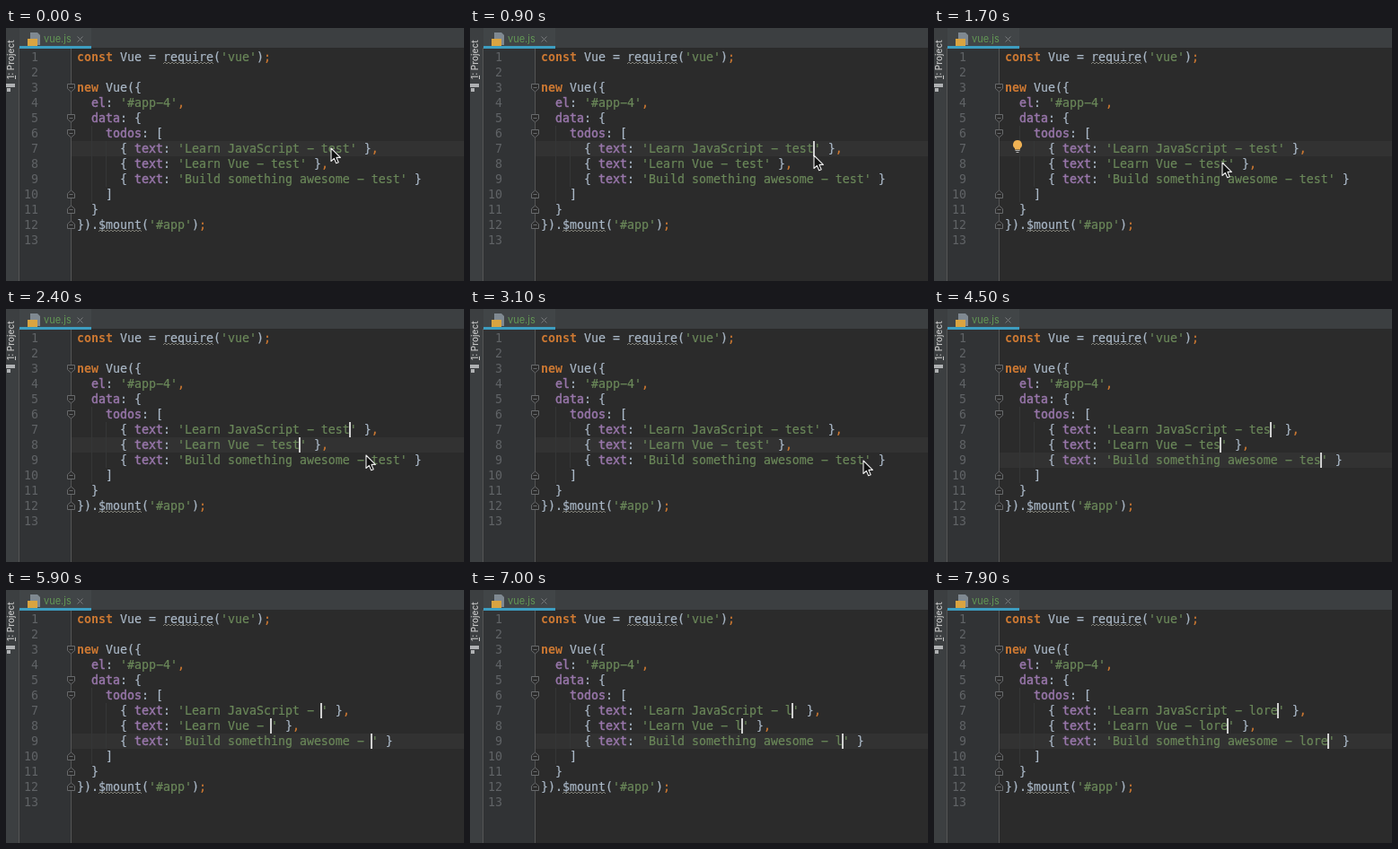
Write an HTML page that moves like this. It is 510x282 px and loops after 8 s.

```html
<!DOCTYPE html>
<html lang="en">
<head>
<meta charset="utf-8">
<title>Editor with several carets</title>
<style>
  html, body { margin: 0; width: 100%; height: 100%; overflow: hidden; background: #2b2b2b; }
  svg { display: block; width: 510px; height: 282px; }
  text { white-space: pre; }
  .code text { font: 13.29px "DejaVu Sans Mono", monospace; fill: #a9b7c6; stroke: #a9b7c6; stroke-width: .2px; }
  .code .num { fill: #606366; stroke: none; text-anchor: end; }
  .code .key { fill: #cc7832; stroke: none; font-weight: bold; }
  .code .sep { fill: #cc7832; stroke: #cc7832; }
  .code .prop { fill: #9876aa; stroke: #9876aa; stroke-width: .45px; }
  .code .str { fill: #6a8759; stroke: #6a8759; }
  .ui { font-family: Inter, sans-serif; }
</style>
</head>
<body>
<svg viewBox="0 0 510 282">
  <rect width="510" height="282" fill="#2b2b2b"/>
  <rect id="band" x="73" width="437" height="17" fill="#323232"/>
  <rect x="15" y="22" width="57" height="260" fill="#313335"/>
  <path d="M72.5 22V282" stroke="#555"/>

  <rect width="510" height="22" fill="#3c3f41"/>
  <rect x="15" width="80" height="22" fill="#414547"/>
  <rect x="15" y="20" width="80" height="3" fill="#3d9dc0"/>
  <path d="M27 5h8l3 3v11H27z" fill="#9aa7b0" opacity=".7"/>
  <rect x="24" y="12" width="11" height="8" fill="#d9a441"/>
  <text class="ui" x="42" y="16" font-size="11" fill="#629755">vue.js</text>
  <path d="M79.500 9.500l6 6m0-6l-6 6" stroke="#777a7c"/>

  <rect width="14" height="282" fill="#3c3f41"/>
  <path d="M14.500 22V282" stroke="#555"/>
  <text class="ui" transform="translate(9 57) rotate(-90)" font-size="10" font-weight="500" fill="#c4c4c4"><tspan text-decoration="underline">1</tspan>: Project</text>
  <path d="M0 62h10v4H0zM1 67h4v4H1z" fill="#afb1b3"/>

  <g class="code">
    <path d="M95.500 109V194M111.500 126V177" stroke="#353637"/>
    <g id="lines"></g>
    <path id="waves" fill="none" stroke="#8a8a80" stroke-width=".9"/>
    <path id="folds" fill="#2b2b2b" stroke="#686a6c"/>
  </g>

  <g id="bulb">
    <path d="M93 125a5 5 0 0 1 3 9v1.500h-6V134a5 5 0 0 1 3-9z" fill="#f0b254"/>
    <path d="M90.500 136.500h5M91.500 138.500h3" stroke="#b4b4b4"/>
  </g>
  <path id="carets" fill="#d0d0d0"/>
  <path id="mouse" d="M0 0V14.500L3.400 11.400L5.700 16.800L8.200 15.700L5.900 10.400H10.400Z" fill="#111" stroke="#eee" stroke-width="1.100" stroke-linejoin="round"/>
</svg>
<script>
const LOOP = 8000, STEP = 100, LEFT = 79, CELL = 8, ROW = 17, FIRST = 7;
const BULB_DELAY = 500, CARET_TIME = 800;
const $ = id => document.getElementById(id);
const rowY = n => 24 + ROW * (n - 1);
const colX = c => LEFT + CELL * c;

const todos = ['Learn JavaScript', 'Learn Vue', 'Build something awesome'];
const todoLine = (i, word) => `      { text: '${todos[i]} − ${word}' }${i < 2 ? ',' : ''}`;
const source = [
  "const Vue = require('vue');", '', 'new Vue({', "  el: '#app−4',", '  data: {', '    todos: [',
  ...todos.map((_, i) => todoLine(i, 'test')), '    ]', '  }', "}).$mount('#app');", ''
];

// Each click adds a caret one row down; each key changes one letter at every caret.
const clicks = [900, 2000, 3200];
const erases = [4500, 4900, 5200, 5500];
const types = [7000, 7500, 7800, 7900];
const events = [...clicks, ...erases, ...types];
const moves = [
  { from: 0, to: 900, x: 383, y: 142 },
  { from: 1000, to: 1700, x: 321, y: 150 },
  { from: 1900, to: 2700, x: 438, y: 169 },
  { from: 3300, to: 3600, x: 530, y: 210 }
];

const count = (times, t) => times.filter(time => time <= t).length;
const ease = k => k * k * (3 - 2 * k);

function mouseAt(t) {
  let x = 362, y = 134;
  for (const m of moves) {
    const k = ease(Math.min(1, Math.max(0, (t - m.from) / (m.to - m.from))));
    x += (m.x - x) * k;
    y += (m.y - y) * k;
  }
  return [x, y];
}

function paint(line) {
  const kinds = ['str', 'key', 'prop', 'sep'];
  return line.replace(/('.*')|\b(const|new)\b|(\w+)(?=:)|([,;])/g,
    (m, ...groups) => `<tspan class="${kinds[groups.slice(0, 4).findIndex(Boolean)]}">${m}</tspan>`);
}

function wave(n, start, length) {
  const zigzag = 'l2 -2l2 2'.repeat(length * CELL / 4);
  return `M${colX(start)} ${rowY(n) + 16}${zigzag}`;
}

function fold(n) {
  const y = rowY(n) + 8.5, dir = n < FIRST ? 1 : -1;
  return `M68.5 ${y - 4 * dir}h8v${5 * dir}l-4 ${3.5 * dir}l-4 ${-3.5 * dir}zM70.5 ${y}h4`;
}

function caret(i, word) {
  const x = colX(todoLine(i, word).lastIndexOf("'")) - 1;
  return `M${x} ${rowY(FIRST + i)}h2v${ROW}h-2z`;
}

$('lines').innerHTML = source.map((line, i) => {
  const y = rowY(i + 1) + 13;
  return `<text class="num" x="36" y="${y}">${i + 1}</text><text id="row${i + 1}" x="${LEFT}" y="${y}">${paint(line)}</text>`;
}).join('');
$('waves').setAttribute('d', wave(1, 12, 7) + wave(12, 3, 6));
$('folds').setAttribute('d', [3, 5, 6, 10, 11, 12].map(fold).join(''));

let shown = 'test';
function render(t) {
  const word = 'test'.slice(0, 4 - count(erases, t)) + 'lore'.slice(0, count(types, t));
  if (word !== shown) {
    shown = word;
    todos.forEach((_, i) => { $('row' + (FIRST + i)).innerHTML = paint(todoLine(i, word)); });
  }

  const clicked = count(clicks, t);
  const idle = t - Math.max(0, ...events.filter(time => time <= t));
  const carets = idle < CARET_TIME ? todos.slice(0, clicked).map((_, i) => caret(i, word)) : [];
  $('carets').setAttribute('d', carets.join(''));
  $('band').setAttribute('y', rowY(FIRST + Math.max(0, clicked - 1)));
  $('bulb').style.display = clicked === 1 && idle >= BULB_DELAY ? '' : 'none';
  $('mouse').setAttribute('transform', `translate(${mouseAt(t)})`);
}

const start = performance.now();
function tick() {
  const t = (performance.now() - start) % LOOP;
  render(Math.floor(t / STEP) * STEP);
  requestAnimationFrame(tick);
}
tick();
</script>
</body>
</html>
```
